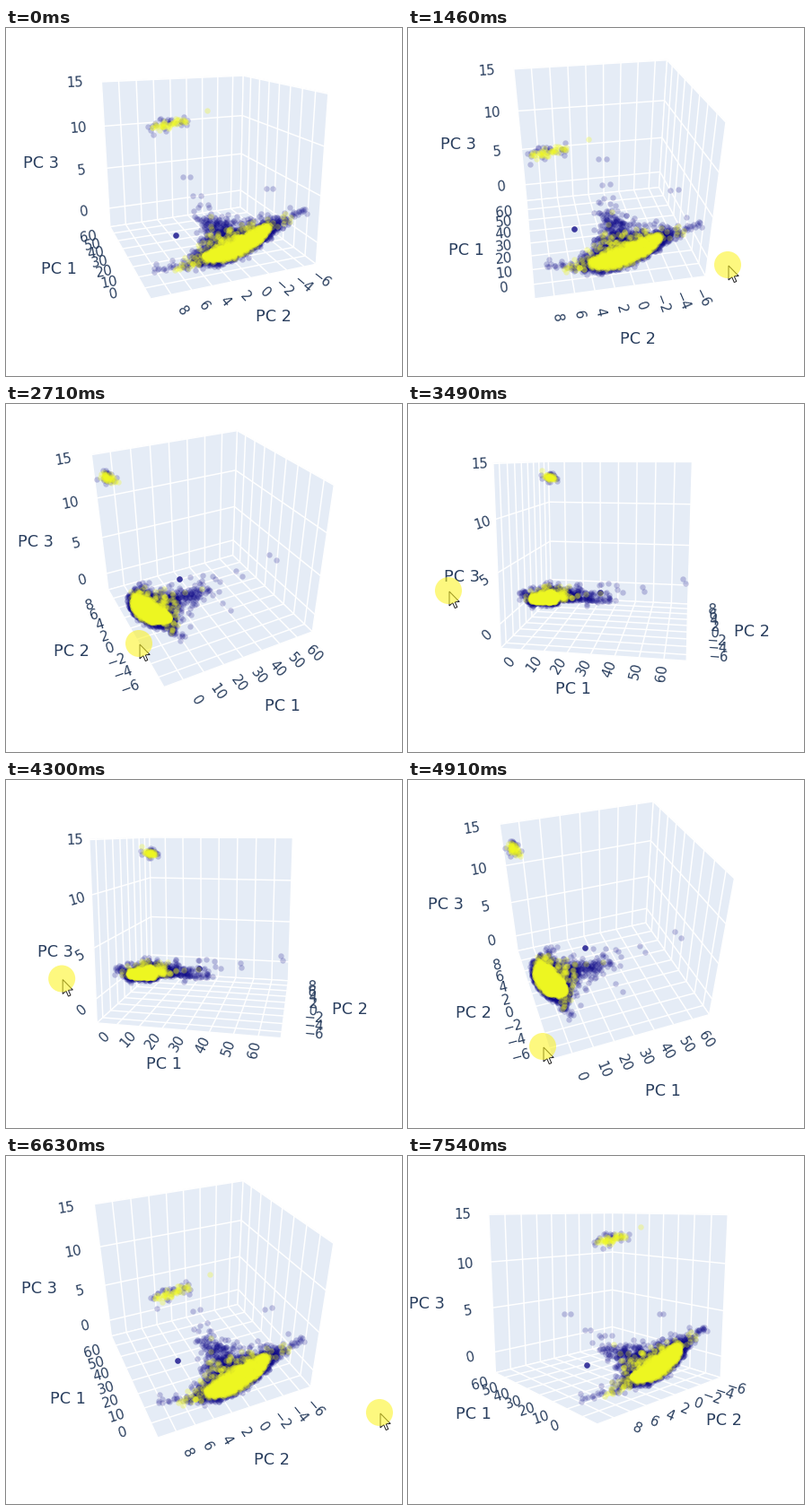
These frames come from a looping animation (441x388 px, 8.1 s). A matplotlib script:

```python
import numpy as np
import matplotlib.pyplot as plt
from matplotlib.animation import FuncAnimation
from matplotlib.collections import LineCollection, PolyCollection
from matplotlib.patches import Circle, Polygon

W, H, DPI = 441, 388, 64
PX = 72 / DPI              # points per pixel
STEP, LOOP = 50, 8100      # ms
CENTRE = np.array([221, 157])
SCALE, DIST = 183, 3.0     # zoom at the cube's centre, camera distance
TURN = 0.354               # degrees per dragged pixel
INK = "#2a3f5f"

NAMES = ["PC 1", "PC 2", "PC 3"]
LIMITS = [(-9, 69), (-7.4, 9.9), (-2.4, 15.1)]
TICKS = [range(0, 61, 10), range(-6, 9, 2), range(0, 16, 5)]
TICK_GAP = 0.165
NAME_GAP = [0.4, 0.38, 0.41]


# ---- motion: two pointer drags turn the camera ----
def smooth(t, k, v):
    """Monotone cubic interpolation through (k, v)."""
    h = np.diff(k)
    d = np.diff(v) / h
    m = np.zeros(len(k))
    for i in range(1, len(k) - 1):
        if d[i - 1] * d[i] > 0:
            m[i] = 2 / (1 / d[i - 1] + 1 / d[i])
    t = np.clip(t, k[0], k[-1])
    i = np.clip(np.searchsorted(k, t, side="right") - 1, 0, len(h) - 1)
    s = (t - k[i]) / h[i]
    return (v[i] * (1 + 2 * s) * (1 - s) ** 2 + h[i] * m[i] * s * (1 - s) ** 2
            + v[i + 1] * s * s * (3 - 2 * s) + h[i] * m[i + 1] * s * s * (s - 1))


class Drag:
    """Pointer path (time, x, y); the view is `pose` when it is at `grip`."""

    def __init__(self, grip, pose, path):
        self.grip, self.pose = np.array(grip), np.array(pose)
        self.path = np.array(path, float)

    def pointer(self, t):
        k, x, y = self.path.T
        return np.array([smooth(t, k, x), smooth(t, k, y)])

    def view(self, t):
        return self.pose + TURN * (self.pointer(t) - self.grip)


ENTER, GRAB, REGRAB = 600, 800, 4200
FIRST = Drag((356, 264), (10.5, 30), [
    (GRAB, 389, 226), (1450, 356, 264), (1850, 262, 306), (2250, 162, 282),
    (2700, 148, 267), (3450, 45, 208), (3950, 38, 205)])
SECOND = Drag((150, 297), (-70.5, 37), [
    (REGRAB, 59, 218), (4900, 150, 297), (5300, 224, 318), (5750, 308, 336),
    (6700, 424, 279), (7500, 466, 222)])


def state(t):
    """Camera angles and pointer position."""
    drag = FIRST if t < REGRAB else SECOND
    x, y = drag.pointer(t)
    x += 80 * np.clip((GRAB - t) / (GRAB - ENTER), 0, 1)
    if t >= SECOND.path[-1, 0]:
        x = W + 40
    return drag.view(t), (x, y)


class Camera:
    def __init__(self, azimuth, elevation):
        a, e = np.radians([azimuth, elevation])
        flat = np.array([-np.cos(a), np.sin(a), 0])
        z = np.array([0, 0, 1])
        self.right = np.array([-np.sin(a), -np.cos(a), 0])
        self.normal = np.cos(e) * flat + np.sin(e) * z
        self.up = np.cos(e) * z - np.sin(e) * flat

    def project(self, pts):
        pts = np.asarray(pts, float)
        zoom = SCALE / (1 - pts @ self.normal / DIST)
        xy = np.stack([pts @ self.right, -(pts @ self.up)], axis=-1)
        return CENTRE + zoom[..., None] * xy


# ---- data, in cube units ----
rng = np.random.default_rng(4)


def lens(n, width, length, thick):
    r, w = np.sqrt(rng.random(n)), rng.random(n) * 2 * np.pi
    u, v = r * np.cos(w), r * np.sin(w)
    y = -0.04 + length * v
    x = -0.39 + width * u - 0.1 * (y + 0.05)
    z = -0.355 - 0.25 * (y + 0.05) + 0.04 * v * v + thick * rng.normal(size=n)
    return np.column_stack([x, y, z])


def fan(n, reach, spread):
    far = np.minimum(rng.exponential(reach, n), 0.42)
    x = -0.4 + far
    y = -0.03 + spread * rng.normal(size=n) * np.exp(-far / 0.25)
    z = -0.36 - 0.25 * y + 0.035 * np.abs(rng.normal(size=n))
    return np.column_stack([x, y, z])


def strand(n, start, end, spread):
    s = rng.random((n, 1))
    return (np.array(start) * (1 - s) + np.array(end) * s
            + spread * rng.normal(size=(n, 3)))


def island(n, spread):
    y = rng.uniform(0.27, 0.47, n)
    x = -0.455 + spread * rng.normal(size=n)
    z = 0.39 + 0.13 * (0.37 - y) + 0.6 * spread * rng.normal(size=n)
    return np.column_stack([x, y, z])


def pair(x, y, z):
    gap = np.array([0.008, -0.03, -0.006])
    return [(x, y, z) - gap, (x, y, z) + gap]


LEFT_TIP, RIGHT_TIP = (-0.42, 0.2, -0.4), (-0.37, -0.28, -0.28)
navy = np.vstack([
    lens(900, 0.085, 0.28, 0.014),
    fan(800, 0.085, 0.15),
    strand(25, LEFT_TIP, (-0.25, 0.4, -0.47), 0.015),
    strand(36, RIGHT_TIP, (-0.39, -0.47, -0.2), 0.017),
    strand(26, (-0.18, 0.02, -0.33), (0.08, 0, -0.28), 0.035),
    island(26, 0.022),
    pair(0.474, -0.057, -0.195), pair(0.232, -0.04, -0.257),
    pair(0.07, -0.025, -0.26), pair(-0.073, -0.417, -0.156),
    [(-0.08, 0.22, -0.367)] * 6,
])
yellow = np.vstack([
    lens(900, 0.072, 0.215, 0.008),
    fan(170, 0.055, 0.15),
    strand(16, LEFT_TIP, (-0.33, 0.31, -0.44), 0.012),
    island(42, 0.012),
    strand(3, RIGHT_TIP, (-0.37, -0.45, -0.12), 0.01),
    [(-0.45, 0.17, 0.44)],
])

# ---- stage ----
fig = plt.figure(figsize=(W / DPI, H / DPI), dpi=DPI, facecolor="white")
ax = fig.add_axes([0, 0, 1, 1])
ax.set(xlim=(0, W), ylim=(H, 0))
ax.axis("off")

panes = ax.add_collection(PolyCollection(
    [], facecolors="#e5ecf6", edgecolors="white", linewidths=1.4 * PX, zorder=1))
grid = ax.add_collection(LineCollection(
    [], colors="white", linewidths=1.5 * PX, zorder=2))


def dots(color, alpha, z):
    return ax.plot([], [], "o", ms=6.4 * PX, mew=0, color=color, alpha=alpha,
                   zorder=z)[0]


def label(text, size):
    return ax.text(0, 0, text, fontsize=size * PX, color=INK, ha="center",
                   va="center", family="DejaVu Sans", zorder=5)


navy_dots = dots("#0d0887", 0.22, 3)
yellow_dots = dots("#f0f921", 0.3, 4)
names = [label(n, 17.6) for n in NAMES]
ticks = [[label(str(v).replace("-", "\u2212"), 15) for v in vals]
         for vals in TICKS]

ARROW = np.array([(0, 0), (0, 16), (3.7, 12.6), (6.3, 18.6), (8.8, 17.5),
                  (6.2, 11.7), (11.2, 11.5)])
arrow = ax.add_patch(Polygon(ARROW, fc="white", ec="#222222", lw=PX, zorder=6))
halo = ax.add_patch(Circle((0, 0), 15, fc="#fdf31c", ec="none", alpha=0.56,
                           zorder=7))


# ---- drawing ----
def unit(axis, value):
    lo, hi = LIMITS[axis]
    return (value - lo) / (hi - lo) - 0.5


def point(i, vi, j, vj, k, vk):
    p = np.zeros(3)
    p[[i, j, k]] = vi, vj, vk
    return p


def draw_box(cam, back):
    faces, lines = [], []
    for j in range(3):
        i, k = [n for n in range(3) if n != j]
        faces.append(cam.project([
            point(i, u, j, back[j], k, v)
            for u, v in ((-.5, -.5), (.5, -.5), (.5, .5), (-.5, .5))]))
        for m, n in ((i, k), (k, i)):
            for v in TICKS[m]:
                lines.append(cam.project([
                    point(m, unit(m, v), j, back[j], n, e) for e in (-.5, .5)]))
    panes.set_verts(faces)
    grid.set_segments(lines)


def axis_edges(cam, back):
    """For each axis: the middle of its edge and the outward direction."""
    nx, ny, _ = -back
    out_x, out_y = np.array([2 * nx, 0, 0]), np.array([0, 2 * ny, 0])
    sides = [(np.array([back[0], ny, 0]), out_y),
             (np.array([nx, back[1], 0]), out_x)]
    return [(np.array([0, ny, -.5]), out_y),
            (np.array([nx, 0, -.5]), out_x),
            min(sides, key=lambda s: s[0] @ cam.right)]


def draw_labels(cam, back):
    for i, (edge, out) in enumerate(axis_edges(cam, back)):
        names[i].set_position(cam.project(edge + NAME_GAP[i] * out))
        for v, txt in zip(TICKS[i], ticks[i]):
            p = edge.copy()
            p[i] = unit(i, v)
            foot, tip = cam.project([p, p + TICK_GAP * out])
            dx, dy = tip - foot
            angle = np.degrees(np.arctan2(-dy, dx))
            txt.set_position(tip)
            txt.set_rotation((angle + 90) % 180 - 90)


def draw(frame):
    angles, (mx, my) = state(frame * STEP)
    cam = Camera(*angles)
    back = np.where(cam.normal > 0, -0.5, 0.5)
    draw_box(cam, back)
    draw_labels(cam, back)
    navy_dots.set_data(*cam.project(navy).T)
    yellow_dots.set_data(*cam.project(yellow).T)
    halo.center = (mx, my)
    arrow.set_xy(ARROW + (mx + 1, my + 1))
    return []


anim = FuncAnimation(fig, draw, frames=LOOP // STEP, interval=STEP,
                     init_func=lambda: draw(0), repeat=True, repeat_delay=0,
                     blit=False)
plt.show()
```
